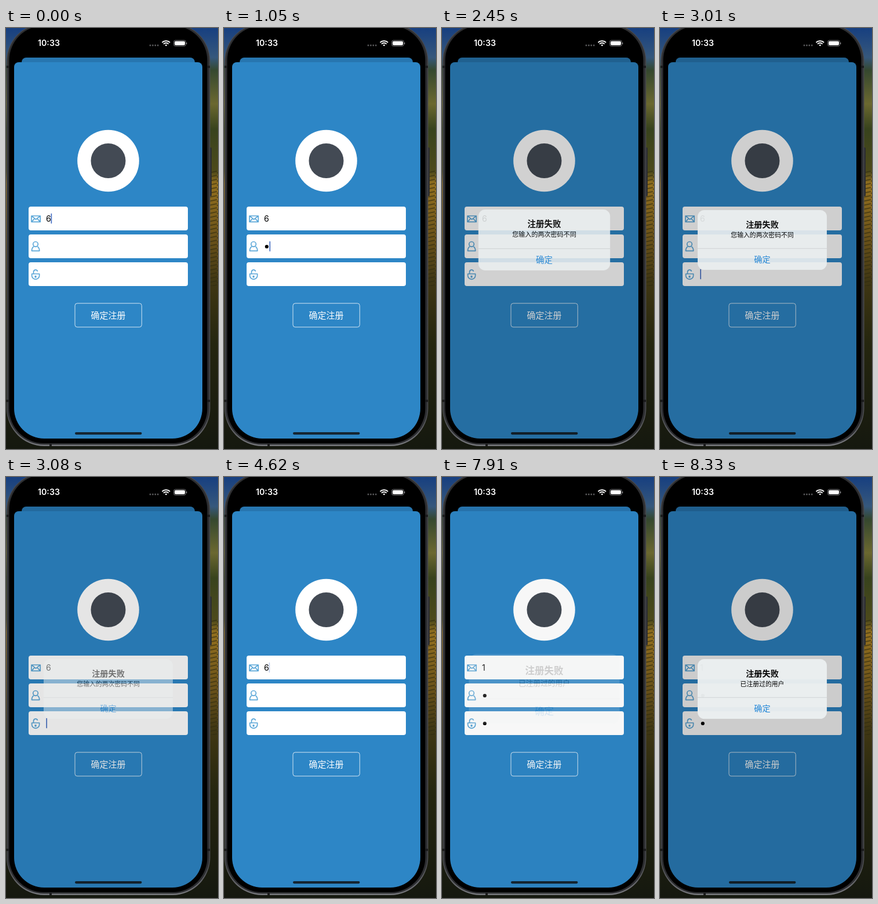
Write an HTML page that moves like this. It is 366 px wide and 726 px high and loops after 8.82 s.

```html
<!DOCTYPE html>
<html lang="zh-CN">
<head>
<meta charset="utf-8">
<title>注册</title>
<style>
  html, body { margin: 0; width: 100%; height: 100%; overflow: hidden; background: #15180f; }
  svg { display: block; width: 366px; height: 726px; }
  text { font-family: Inter, "Noto Sans CJK SC", "Noto Sans CJK", sans-serif; }
  .mid { text-anchor: middle; }
  .icon { fill: none; stroke: #5ba7d8; stroke-width: 1.7; stroke-linejoin: round; }
</style>
</head>
<body>
<svg viewBox="0 0 366 726">
  <defs>
    <linearGradient id="hills" x2="0" y2="1">
      <stop offset="0" stop-color="#173f80"/>
      <stop offset=".07" stop-color="#36587c"/>
      <stop offset=".1" stop-color="#35482f"/>
      <stop offset=".18" stop-color="#6b6830"/>
      <stop offset=".24" stop-color="#38431d"/>
      <stop offset=".34" stop-color="#4d4a1b"/>
      <stop offset=".37" stop-color="#93701f"/>
      <stop offset=".5" stop-color="#6b5219"/>
      <stop offset=".6" stop-color="#403713"/>
      <stop offset=".75" stop-color="#25260f"/>
      <stop offset="1" stop-color="#15180f"/>
    </linearGradient>
    <linearGradient id="edge" x2="0" y2="1">
      <stop offset="0" stop-color="#46474b"/>
      <stop offset=".93" stop-color="#4c4d51"/>
      <stop offset="1" stop-color="#77787d"/>
    </linearGradient>
    <pattern id="vines" width="14" height="7" patternUnits="userSpaceOnUse">
      <path d="M0 5L14 2" stroke="#2f2a0e" stroke-width="2" opacity=".6"/>
    </pattern>
    <clipPath id="screen"><rect x="14" y="5" width="325" height="703" rx="52"/></clipPath>
  </defs>

  <rect width="366" height="726" fill="url(#hills)"/>
  <rect x="352" y="245" width="14" height="200" fill="url(#vines)"/>

  <!-- phone body -->
  <rect x="351" y="206" width="4" height="84" rx="1.5" fill="#2b2c30"/>
  <rect x="1" y="-8" width="351.500" height="729" rx="65" fill="url(#edge)"/>
  <rect x="2.500" y="-6.500" width="348.500" height="725" rx="63" fill="#2d2e31"/>
  <path d="M1 67h4M348 67h4M1 643h4M348 643h4M77 717v4" stroke="#1b1b1d" stroke-width="4"/>
  <rect x="5.500" y="-4" width="342" height="720" rx="60"/>

  <!-- status bar -->
  <text x="55" y="31.200" font-size="14.200" font-weight="600" fill="#fff">10:33</text>
  <path d="M249 30h14" stroke="#5a5a5c" stroke-width="2.800" stroke-linecap="round" stroke-dasharray="0 4.400"/>
  <g fill="none" stroke="#fff" stroke-width="2">
    <path d="M269.500 25a9.800 9.800 0 0 1 13.600 0M272 27.600a6.200 6.200 0 0 1 8.600 0"/>
    <path d="M276.300 31.500l-2-2.200a3 3 0 0 1 4 0z" fill="#fff" stroke="none"/>
  </g>
  <rect x="289.500" y="21.300" width="21" height="10" rx="3" fill="none" stroke="#77777a"/>
  <rect x="291" y="22.800" width="18" height="7" rx="1.800" fill="#fff"/>
  <path d="M311.800 25v3" stroke="#77777a" stroke-width="1.300"/>

  <g clip-path="url(#screen)">
    <rect x="27" y="51" width="299" height="60" rx="8" fill="#2776b0"/>
    <rect x="14" y="59" width="325" height="670" rx="8" fill="#2d86c6"/>

    <circle cx="176.500" cy="229" r="53.300" fill="#fff"/>
    <circle cx="176.500" cy="229" r="30" fill="#434a54"/>

    <g id="rows"></g>
    <g class="icon">
      <path d="M44 324h15.200v10.300h-15.200zl7.600 6.200l7.600-6.200M44 334.300l5.400-5.600M59.200 334.300l-5.400-5.600"/>
      <circle cx="51" cy="372.800" r="4.300"/>
      <path d="M47.800 377q-3.300 2-3.300 7.300h13.200q0-5.300-3.300-7.300"/>
      <path d="M44.600 424h13v3a6.500 6.300 0 0 1-13 0zM47.500 424v-3a3.600 3.900 0 0 1 7-1.300"/>
      <path d="M51 427v3.600" stroke-width="3"/>
    </g>
    <text id="mail" x="69" y="334" font-size="14.200"></text>
    <rect id="caret" width="1.700" height="17.600" rx=".8" fill="#4770c4"/>

    <rect x="119" y="474.800" width="115.300" height="41" rx="4" fill="none" stroke="#d3e5f3"/>
    <text id="submit" class="mid" x="176.500" y="500.600" font-size="15" fill="#fff">确定注册</text>

    <rect x="119" y="697" width="115.500" height="4.200" rx="2.100" fill="#152530"/>
    <path id="dim" d="M14 729V67a8 8 0 0 1 8-8h5a8 8 0 0 1 8-8H318a8 8 0 0 1 8 8h5a8 8 0 0 1 8 8V729z"/>

    <g id="alert">
      <rect x="-111.500" y="-51.500" width="223" height="103" rx="11.500" fill="#ebeff0" fill-opacity=".97"/>
      <text class="mid" y="-22" font-size="14.200" font-weight="600">注册失败</text>
      <text id="reason" class="mid" y="-5" font-size="10.850"></text>
      <path d="M-111.500 14.800h223" stroke="#cdd2d4" stroke-width=".9"/>
      <text class="mid" y="38.300" font-size="14.200" fill="#2488d8">确定</text>
    </g>
  </g>
</svg>
<script>
const LOOP = 8820, STEP = 70;
const $ = id => document.getElementById(id);
const clamp = v => Math.max(0, Math.min(1, v));
const rowTop = row => 308 + 48 * row;

const EMPTY = 69.3, DOT = 78.4, SIX = 77.5, ONE = 75;
// start, end, row, x, fade-in, fade-out
const carets = [
  [0, 490, 0, SIX, STEP, 210],
  [630, 1050, 1, EMPTY],
  [1050, 1610, 1, DOT],
  [1610, 1890, 2, EMPTY, 140],
  [1890, 2240, 2, DOT],
  [3010, 3570, 2, EMPTY, STEP, 210],
  [3920, 4620, 2, EMPTY, 210],
  [4620, 5390, 0, SIX, 210],
  [5390, 5810, 0, EMPTY],
  [5810, 6370, 0, ONE, STEP, 210],
  [6580, 6790, 1, EMPTY],
  [6790, 7350, 1, DOT],
  [7350, 7490, 2, EMPTY],
  [7490, 7840, 2, DOT]
];

$('rows').innerHTML = [0, 1, 2].map(row => {
  const y = rowTop(row);
  return `<rect x="39" y="${y}" width="275" height="41" rx="4" fill="#fff"/>` +
    (row ? `<circle id="dot${row}" cx="73.800" cy="${y + 21}" r="3.100"/>` : '');
}).join('');

// Critically damped spring from 0 to 1
function spring(ms) {
  const s = Math.max(0, ms) * 0.0186;
  return 1 - (1 + s) * Math.exp(-s);
}

function drawCaret(t) {
  let alpha = 0;
  for (const [start, end, row, x, fadeIn = STEP, fadeOut = STEP] of carets) {
    const a = clamp((t - start + STEP) / fadeIn) * clamp(1 - (t - end + STEP) / fadeOut);
    if (t < start || a <= 0) continue;
    alpha = a;
    $('caret').setAttribute('x', x);
    $('caret').setAttribute('y', rowTop(row) + 11.8);
  }
  $('caret').setAttribute('opacity', alpha);
}

function drawAlert(t) {
  const second = t > 5000, closing = !second && t >= 3010;
  const shown = spring(t - (second ? 7871 : 2240));
  const level = closing ? (t < 3290 ? 1 - spring(t - 2990) : 0) : shown;
  const scale = closing ? 1 : 1.2 - 0.2 * shown;
  $('dim').setAttribute('opacity', 0.2 * level);
  $('alert').setAttribute('opacity', level);
  $('alert').setAttribute('transform', `translate(176.5 365.5) scale(${scale})`);
  $('reason').textContent = second ? '已注册过的用户' : '您输入的两次密码不同';
}

function draw(now) {
  const t = Math.floor(now % LOOP / STEP) * STEP;
  const within = (a, b) => t >= a && t < b;
  $('mail').textContent = t < 5390 ? '6' : t < 5810 ? '' : '1';
  $('dot1').setAttribute('opacity', +(within(1050, 2240) || t >= 6790));
  $('dot2').setAttribute('opacity', +(within(1890, 2240) || t >= 7490));
  $('submit').setAttribute('opacity', within(2100, 2240) || within(7700, 7840) ? 0.3 : 1);
  drawCaret(t);
  drawAlert(t);
}

const begin = performance.now();
function tick() {
  draw(performance.now() - begin);
  requestAnimationFrame(tick);
}
tick();
</script>
</body>
</html>
```
